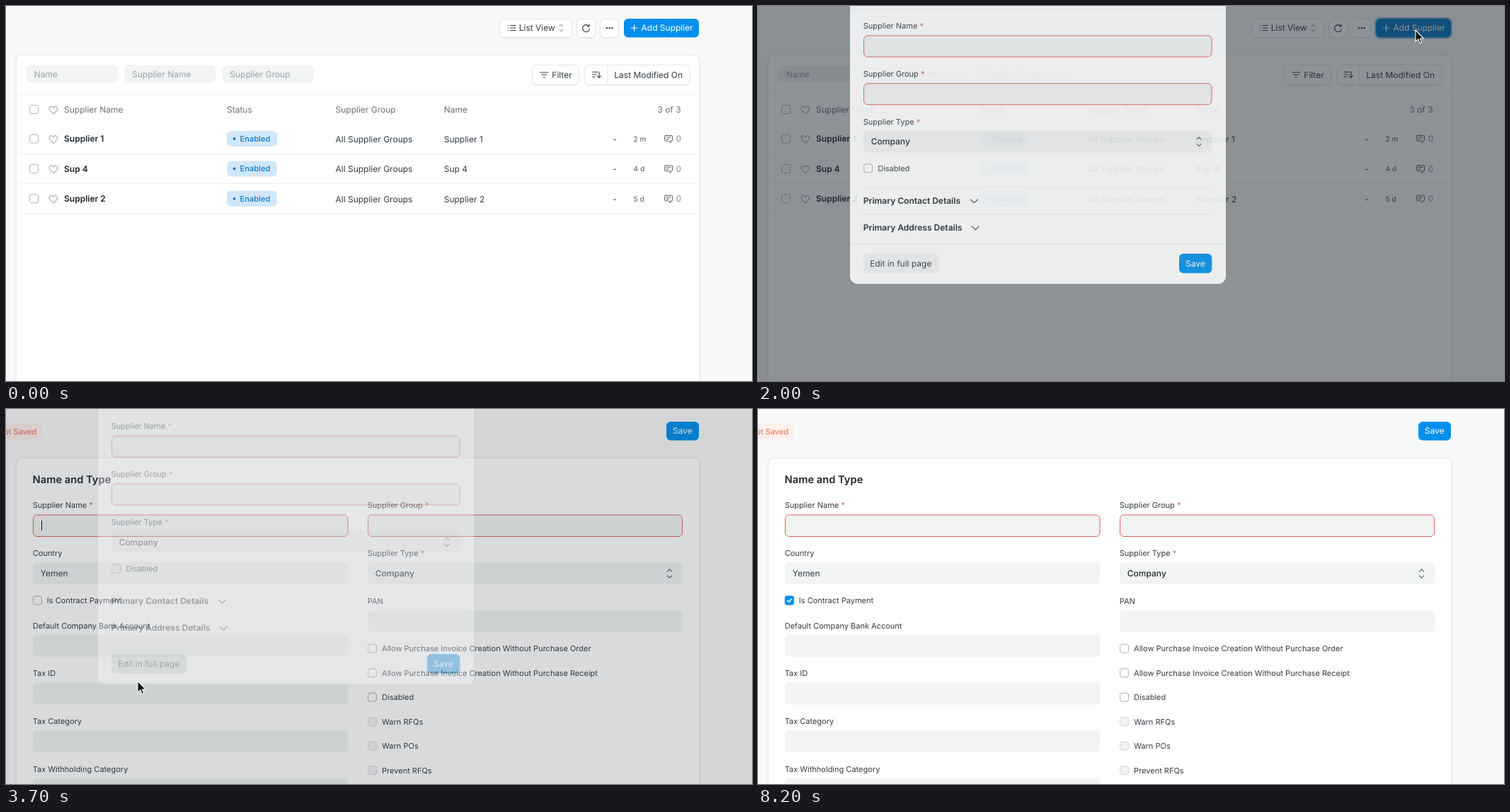
These frames come from a looping animation (1054 by 531 pixels, 8300 ms). An HTML page:

```html
<!DOCTYPE html>
<html lang="en">
<head>
<meta charset="utf-8">
<title>Add supplier</title>
<style>
html, body { margin: 0; width: 100%; height: 100%; overflow: hidden; background: #f7f9f9; }
svg { display: block; width: 100vw; height: 100vh; }
text { font-family: Inter, "Noto Sans", sans-serif; text-rendering: geometricPrecision; white-space: pre; }
</style>
</head>
<body>
<svg id="stage" viewBox="0 0 1054 531"></svg>
<script>
const LOOP = 8300, STEP = 100;
const INK = '#1f272e', BODY = '#333c44', MUTED = '#687178', BLUE = '#0090ec', RED = '#e0625c', FIELD = '#f2f4f4', LINE = '#edf0f1';

// Drawing helpers; text is placed by its vertical centre.
const rect = (x, y, w, h, r, fill, more = '') =>
  `<rect x="${x}" y="${y}" width="${w}" height="${h}" rx="${r}" fill="${fill}" ${more}/>`;
const text = (x, y, s, size = 12, fill = BODY, weight = 400, more = '') =>
  `<text x="${x}" y="${y + size * 0.364}" font-size="${size}" fill="${fill}" font-weight="${weight}" ${more}>${s}</text>`;
const path = (d, stroke = BODY, w = 1, more = '') =>
  `<path d="${d}" fill="none" stroke="${stroke}" stroke-width="${w}" stroke-linecap="round" stroke-linejoin="round" ${more}/>`;
const hline = (x1, x2, y) => `<path d="M${x1} ${y}H${x2}" stroke="${LINE}"/>`;
const group = (id, inner, more = '') => `<g id="${id}" ${more}>${inner}</g>`;

const label = (x, y, s, required) =>
  text(x, y, s + (required ? ` <tspan fill="#e8654f">*</tspan>` : ''), 11);
const field = (x, y, w, h, required) => required
  ? rect(x + .5, y + .5, w - 1, h - 1, 5.5, FIELD, `stroke="${RED}"`)
  : rect(x, y, w, h, 6, FIELD);
const box = (cx, cy, off) =>
  rect(cx - 6, cy - 6, 12, 12, 3, off ? '#f1f2f2' : '#fff', `stroke="${off ? '#d3d7d9' : '#aab2b7'}"`);
const check = (cx, cy, s, off) => box(cx, cy, off) + text(cx + 13.5, cy, s, 11);
const arrows = (cx, cy, s = 1) =>
  path(`M-3 -3.2L0 -6.2L3 -3.2M-3 3.2L0 6.2L3 3.2`, '#505a62', 1.1, `transform="translate(${cx} ${cy}) scale(${s})"`);
const button = (x, y, w, h) =>
  rect(x - .5, y, w + 1, h + 1.2, 6.5, 'rgba(25,39,52,.09)') + rect(x, y, w, h, 6, '#fff', 'stroke="#e3e7e9"');
const saveButton = (x, y, w, h) => rect(x, y, w, h, 6, BLUE) + text(x + 9, y + h / 2 - .3, 'Save', 12, '#fff');
const card = () =>
  rect(14, 69.5, 966, 480, 8, 'none', 'stroke="rgba(25,39,52,.035)" stroke-width="3"') +
  rect(14.5, 69.5, 965, 480, 7.5, '#fff', 'stroke="#e9eded"');
const heart = (cx, cy) => path(
  `M${cx} ${cy + 5.3}L${cx - 5} ${cy + .3}C${cx - 8} ${cy - 3.6} ${cx - 2.4} ${cy - 7.6} ${cx} ${cy - 3.1}` +
  `C${cx + 2.4} ${cy - 7.6} ${cx + 8} ${cy - 3.6} ${cx + 5} ${cy + .3}Z`, '#7c868d');

function listRow(name, age, i) {
  const y = 188 + 42.4 * i;
  return box(39.6, y) + heart(67, y + .8) + text(82, y, name, 12, INK, 600) +
    rect(312, y - 11, 71, 22, 6, '#d0e7f8') + `<circle cx="322.6" cy="${y}" r="1.9" fill="#1278c4"/>` +
    text(330.6, y, 'Enabled', 11.1, '#1278c4', 500) +
    text(465.5, y + .5, 'All Supplier Groups') + text(618.7, y + .5, name) +
    text(857.5, y + .5, '-') + text(886.5, y, age, 10.2, '#505a62') +
    path(`M932 ${y - 4.6}H940.3Q941.6 ${y - 4.6} 941.6 ${y - 3.3}V${y + 1.8}Q941.6 ${y + 3.1} 940.3 ${y + 3.1}H939V${y + 6}L935.5 ${y + 3.1}` +
      `H932Q930.6 ${y + 3.1} 930.6 ${y + 1.8}V${y - 3.3}Q930.6 ${y - 4.6} 932 ${y - 4.6}ZM933 ${y - 2}H939M933 ${y + .6}H936.5`, '#505a62') +
    text(946.5, y, '0', 12, '#8a939a') + hline(19, 974, Math.floor(y + 21.2) + .5);
}

function listPage() {
  let s = button(697.5, 18.5, 102, 26);
  for (const y of [27.5, 31, 34.5]) s += path(`M709.3 ${y}H709.6M712.8 ${y}H720`, BODY, 1.2);
  s += text(724.7, 31, 'List View') + arrows(784.6, 31, .78);
  s += button(806.5, 18.5, 26, 26) +
    path('M823.6 28.6A5 5 0 1 0 824.6 32.2M824 26V29H821', BODY, 1.1);
  s += button(839.5, 18.5, 26, 26);
  for (const x of [848.9, 852.7, 856.5]) s += `<circle cx="${x}" cy="31.2" r="1.2" fill="${BODY}"/>`;
  s += rect(872, 17, 108, 28.5, 7.5, 'none', 'id="ring" stroke="#8fc5ef" stroke-width="2"') +
    rect(873, 18, 106, 26.5, 6, BLUE, 'id="add"') +
    path('M883.3 31H891.7M887.5 26.8V35.2', '#fff', 1.1) + text(897.5, 31, 'Add Supplier', 12, '#fff');
  s += card();
  ['Name', 'Supplier Name', 'Supplier Group'].forEach((n, i) => {
    const x = 29 + 138.3 * i;
    s += rect(x, 84, 129, 24, 6, FIELD) + text(x + 10.7, 96.3, n, 12, '#98a1a8');
  });
  s += button(743.5, 83.5, 65.5, 28) + path('M754.5 94H766M756.8 97.5H763.7M759 101H761.5', BODY, 1.1) + text(771.3, 97.3, 'Filter');
  s += button(817.5, 83.5, 148.5, 28) + `<path d="M849.5 84V111.5" stroke="#e3e7e9"/>` +
    path('M828.5 93.5H836M828.5 97H834M828.5 100.5H832M838 93.5V101.5M835.6 99.2L838 101.6L840.4 99.2', BODY, 1.1) +
    text(859.3, 97.3, 'Last Modified On');
  s += hline(15, 979, 125.5) + box(39.6, 146.5) + heart(67, 147.3);
  [[82, 'Supplier Name'], [312, 'Status'], [465.5, 'Supplier Group'], [618.7, 'Name']]
    .forEach(([x, n]) => s += text(x, 146.2, n, 12, MUTED));
  s += text(953.6, 146.2, '3 of 3', 12, MUTED, 400, 'text-anchor="end"');
  return s + [['Supplier 1', '2 m'], ['Sup 4', '4 d'], ['Supplier 2', '5 d']].map((r, i) => listRow(...r, i)).join('');
}

function formPage() {
  let s = rect(-30, 21, 81, 22, 6, '#fdf0ea') + text(43, 32, 'Not Saved', 11.1, '#e4714f', 400, 'text-anchor="end"') +
    saveButton(933, 18, 46, 26.5) + card() + text(37.6, 100, 'Name and Type', 14.7, INK, 600);
  s += label(37.7, 136, 'Supplier Name', true) + field(38, 149.5, 445.5, 31.5, true);
  s += label(37.7, 204, 'Country') + field(38, 217.5, 445.5, 30.5) + text(48.8, 232.8, 'Yemen');
  s += check(44.3, 271, 'Is Contract Payment');
  ['Default Company Bank Account', 'Tax ID', 'Tax Category', 'Tax Withholding Category'].forEach((n, i) => {
    const y = 306.5 + 67.7 * i;
    s += label(37.7, y, n) + field(38, y + 13.2, 445.5, 31);
  });
  s += label(510.8, 136, 'Supplier Group', true) + field(511, 149.5, 445, 31.5, true);
  s += label(510.8, 204, 'Supplier Type', true) + field(511, 217.5, 445, 30.5) +
    text(521.8, 232.8, 'Company', 12, INK, 500) + arrows(937.5, 233);
  s += label(510.8, 271.7, 'PAN') + field(511, 285, 445, 31);
  ['Allow Purchase Invoice Creation Without Purchase Order', 'Allow Purchase Invoice Creation Without Purchase Receipt',
    'Disabled', 'Warn RFQs', 'Warn POs', 'Prevent RFQs']
    .forEach((n, i) => s += check(517.6, 339.2 + 34.5 * i, n, i > 2));
  s += group('ticked',
    rect(37, 263.7, 14.6, 14.6, 4.5, 'none', 'id="tickRing" stroke="#9fd0f4" stroke-width="2"') +
    rect(37.8, 264.5, 13, 13, 3, BLUE) + path('M41.4 271.2L43.6 273.4L47.4 268.9', '#fff', 1.5));
  return s + rect(50, 158, 1, 14, 0, '#111', 'id="caret"');
}

function dialog() {
  let s = rect(130, -60, 531, 474, 11, '#fff') + text(149, -3, 'New Supplier', 14.5, INK, 600) + hline(130, 661, 25.5);
  s += label(148.8, 48.5, 'Supplier Name', true) + field(149, 62, 492.5, 31, true);
  s += label(148.8, 116.7, 'Supplier Group', true) + field(149, 129.8, 492.5, 31, true);
  s += label(148.8, 184.2, 'Supplier Type', true) + field(149, 197, 492.5, 31) +
    text(159.8, 212.6, 'Company', 12, INK, 500) + arrows(623, 212.7);
  s += check(155.7, 250.5, 'Disabled');
  [['Primary Contact Details', 305.4, 296.5], ['Primary Address Details', 307.3, 334.5]].forEach(([n, x, y]) => {
    s += hline(149, 641.5, y - 19) + text(148.8, y, n, 12, INK, 600) + path(`M${x - 5} ${y - 2}L${x} ${y + 3}L${x + 5} ${y - 2}`, BODY, 1.1);
  });
  s += hline(130, 661, 357.5) + rect(149, 371.3, 106, 27.5, 6, FIELD, 'id="edit"') + text(158, 385, 'Edit in full page') +
    saveButton(595, 371.3, 46.3, 27.5);
  return s + rect(160, 70, 1, 14, 0, '#111', 'id="dialogCaret"');
}

const stage = document.getElementById('stage');
stage.innerHTML = rect(0, 0, 1054, 531, 0, '#f7f9f9') + group('list', listPage()) + group('form', formPage()) +
  rect(0, 0, 1054, 531, 0, '#1f272e', 'id="shade"') + group('dialog', dialog()) +
  group('cursor', '<path d="M0 0V16.4L3.8 12.9L6.3 18.6L8.8 17.5L6.4 12H11.4Z" fill="#111" stroke="#fff" stroke-width="1.1" stroke-linejoin="round"/>');

const el = {};
stage.querySelectorAll('[id]').forEach(e => el[e.id] = e);
const set = (id, name, v) => el[id].setAttribute(name, v);
const show = (id, on) => set(id, 'display', on ? 'inline' : 'none');
const clamp = v => Math.min(1, Math.max(0, v));
const easeOut = p => 1 - Math.pow(1 - clamp(p), 1.65);
const within = (t, ...spans) => spans.some(([a, b]) => t >= a && t < b);

// Pointer moves: first step time, number of steps, destination.
const moves = [
  [300, 1, 911, 13], [400, 1, 927, 36], [600, 1, 929, 34], [2300, 1, 902, 65], [2500, 2, 314, 347],
  [2800, 3, 186, 385], [4100, 1, 112, 359], [4400, 4, 36, 274], [5500, 3, 42, 275], [6400, 2, 38, 187], [6800, 6, 51, 7]
];
function pointer(t) {
  let x = 911, y = 13;
  for (const [start, steps, tx, ty] of moves) {
    if (t < start) break;
    const p = easeOut(((t - start) / STEP + 1) / steps);
    x += (tx - x) * p;
    y += (ty - y) * p;
  }
  return [x, y];
}

function draw(ms) {
  const t = Math.floor((ms % LOOP) / STEP) * STEP;
  const pressed = t >= 1600;
  show('list', t < 3600);
  show('form', t >= 3600);
  set('add', 'fill', pressed ? '#0078cb' : BLUE);
  show('ring', pressed);

  const leave = clamp((t - 3600) / 150);
  set('shade', 'opacity', .5 * clamp((t - 1800) / 150) * (1 - leave));
  set('dialog', 'opacity', clamp((t - 1875) / 150) * (1 - leave));
  const lift = t < 3600 ? 1 - easeOut((t - 1875) / 300) : easeOut((t - 3600) / 300);
  set('dialog', 'transform', `translate(0 ${-50 * lift})`);
  show('dialog', within(t, [1900, 3800]));
  show('dialogCaret', within(t, [2300, 2800]));
  set('edit', 'fill', t >= 3300 ? '#d6dcdc' : FIELD);

  show('caret', within(t, [3600, 4100], [5000, 5500], [5900, 6300]));
  show('ticked', t >= 6300);
  show('tickRing', within(t, [6300, 8200]));

  const [x, y] = pointer(t);
  show('cursor', within(t, [300, 7400]));
  set('cursor', 'transform', `translate(${x.toFixed(1)} ${y.toFixed(1)})`);
}

const begin = performance.now();
function tick() {
  draw(performance.now() - begin);
  requestAnimationFrame(tick);
}
tick();
</script>
</body>
</html>
```
